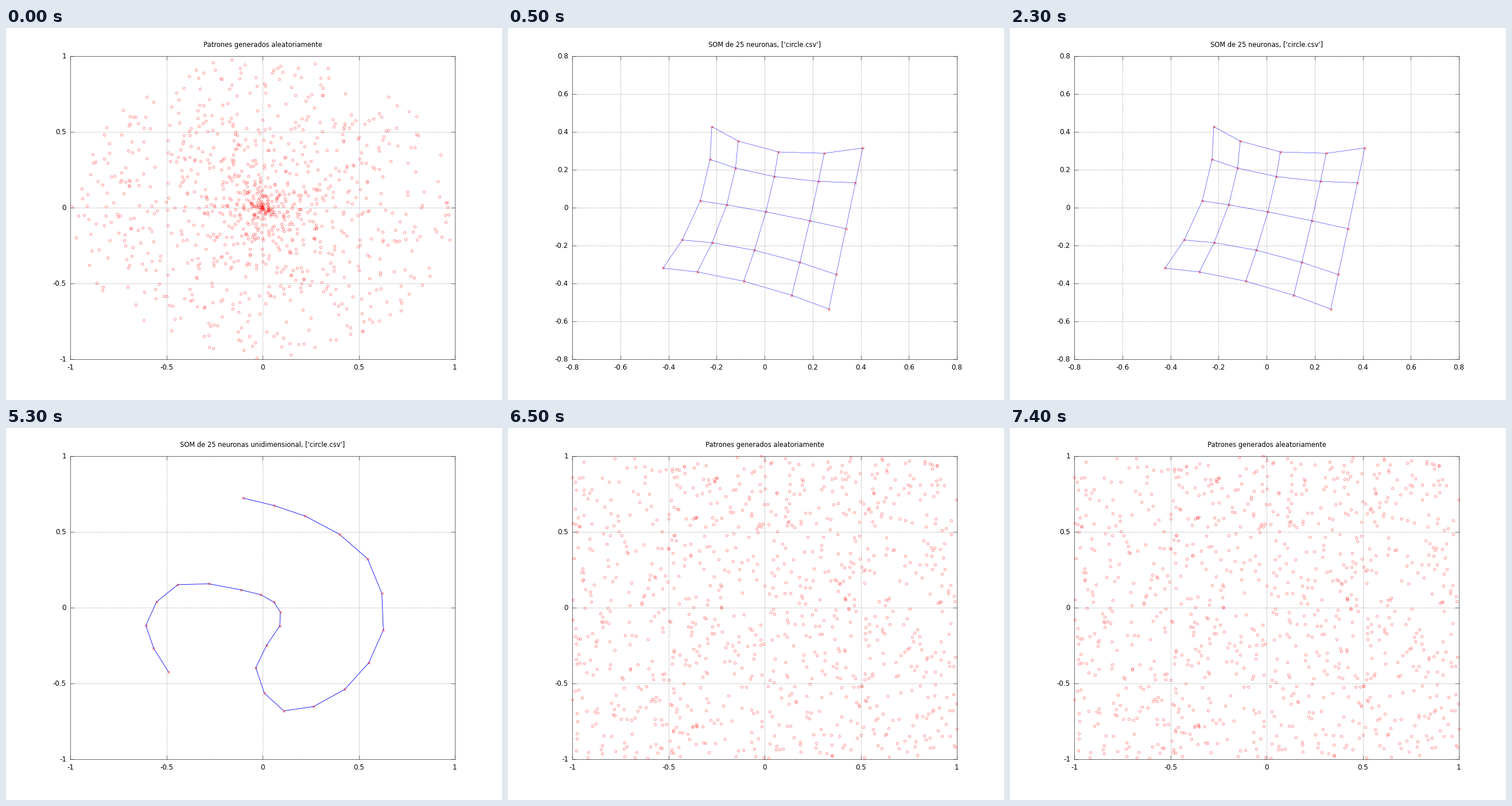
Write a matplotlib script that moves like this. It is 864 px wide and 648 px high and loops after 8 s.

```python
import numpy as np
import matplotlib.pyplot as plt
from matplotlib.animation import FuncAnimation

W, H, DPI = 864, 648, 72
LEFT, RIGHT = 0.13 * W, 0.905 * W
TOP, BOTTOM = 0.075 * H, 0.89 * H
THIN = 0.5
STEP_MS = 500
SCENE_STEPS = (1, 6, 6, 3)  # how many steps each plot stays

plt.rcParams["font.family"] = "DejaVu Sans"
plt.rcParams["toolbar"] = "None"

fig = plt.figure(figsize=(W / DPI, H / DPI), dpi=DPI, facecolor="white")


def to_px(x, y, lim):
    px = LEFT + (x + lim) / (2 * lim) * (RIGHT - LEFT)
    py = BOTTOM - (y + lim) / (2 * lim) * (BOTTOM - TOP)
    return px, py


def line(ax, xs, ys, color="black", lw=THIN, **style):
    ax.plot(xs, ys, color=color, lw=lw, solid_capstyle="butt",
            dash_capstyle="butt", **style)


def new_plot(title, lim, count):
    """Full-figure axes in pixels from the top left, with grid and labels."""
    ax = fig.add_axes([0, 0, 1, 1])
    ax.set_xlim(0, W)
    ax.set_ylim(H, 0)
    ax.axis("off")

    dots = {"linestyle": (0, (2, 4)), "zorder": 1}
    tick = 7
    for v in np.linspace(-lim, lim, count):
        x, y = to_px(v, v, lim)
        label = f"{round(v, 1) + 0.0:g}"
        line(ax, [x, x], [BOTTOM, TOP], **dots)
        line(ax, [LEFT, RIGHT], [y, y], **dots)
        for edge, inward in ((TOP, tick), (BOTTOM, -tick)):
            line(ax, [x, x], [edge, edge + inward])
        for edge, inward in ((LEFT, tick), (RIGHT, -tick)):
            line(ax, [edge, edge + inward], [y, y])
        ax.text(x, 595, label, size=12, ha="center", va="baseline")
        ax.text(105, y + 4, label, size=12, ha="right", va="baseline")
    line(ax, [LEFT, RIGHT, RIGHT, LEFT, LEFT],
         [TOP, TOP, BOTTOM, BOTTOM, TOP])
    ax.text((LEFT + RIGHT) / 2, 33, title, size=11.5,
            ha="center", va="baseline")
    return ax


def scatter_plot(x, y):
    ax = new_plot("Patrones generados aleatoriamente", 1, 5)
    px, py = to_px(x, y, 1)
    ax.plot(px, py, "o", ms=4.4, mfc="none", mec="red", mew=0.36, zorder=3)
    ax.plot(px, py, "o", ms=0.9, mfc="red", mec="none", alpha=0.5, zorder=3)
    return ax


def disc_plot():
    rng = np.random.default_rng(7)
    r = rng.random(1000)
    a = rng.random(1000) * 2 * np.pi
    return scatter_plot(r * np.cos(a), r * np.sin(a))


def square_plot():
    rng = np.random.default_rng(21)
    x, y = rng.uniform(-1, 1, (2, 1000))
    return scatter_plot(x, y)


def crosses(ax, x, y):
    ax.plot(np.ravel(x), np.ravel(y), "x", ms=4.2, mec="red", mew=0.6,
            zorder=4)


def mesh_plot():
    """5x5 map: a quadratic patch through nine nodes, tighter at its rim."""
    ax = new_plot("SOM de 25 neuronas, ['circle.csv']", 0.8, 9)
    nodes = np.array([
        [(-0.220, 0.427), (0.057, 0.293), (0.408, 0.314)],
        [(-0.268, 0.035), (0.005, -0.023), (0.338, -0.112)],
        [(-0.423, -0.320), (-0.087, -0.389), (0.267, -0.536)],
    ])
    u = np.array([-1, -0.57, 0, 0.57, 1])
    basis = np.stack([u * (u - 1) / 2, 1 - u * u, u * (u + 1) / 2], axis=1)
    mesh = np.einsum("ia,jb,abk->kij", basis, basis, nodes)
    x, y = to_px(*mesh, 0.8)
    line(ax, x, y, color="blue", zorder=3)
    line(ax, x.T, y.T, color="blue", zorder=3)
    crosses(ax, x, y)
    return ax


def chain_plot():
    """25-point chain: key points with a smooth midpoint in each gap."""
    ax = new_plot("SOM de 25 neuronas unidimensional, ['circle.csv']", 1, 5)
    keys = np.array([
        (-0.103, 0.722), (0.221, 0.603), (0.546, 0.321), (0.628, -0.148),
        (0.427, -0.540), (0.110, -0.682), (-0.036, -0.398), (0.089, -0.121),
        (0.058, 0.036), (-0.115, 0.117), (-0.441, 0.151), (-0.608, -0.119),
        (-0.490, -0.425),
    ])
    p = np.vstack([2 * keys[0] - keys[1], keys, 2 * keys[-1] - keys[-2]])
    chain = np.empty((2 * len(keys) - 1, 2))
    chain[::2] = keys
    chain[1::2] = (9 * (p[1:-2] + p[2:-1]) - p[:-3] - p[3:]) / 16
    x, y = to_px(*chain.T, 1)
    line(ax, x, y, color="blue", lw=0.85, zorder=3)
    crosses(ax, x, y)
    return ax


scenes = [disc_plot(), mesh_plot(), chain_plot(), square_plot()]
schedule = np.repeat(np.arange(len(scenes)), SCENE_STEPS)


def update(step):
    for i, ax in enumerate(scenes):
        ax.set_visible(i == schedule[step])
    return scenes


anim = FuncAnimation(fig, update, frames=len(schedule), interval=STEP_MS,
                     init_func=lambda: update(0), repeat=True,
                     repeat_delay=0, blit=False)
plt.show()
```
